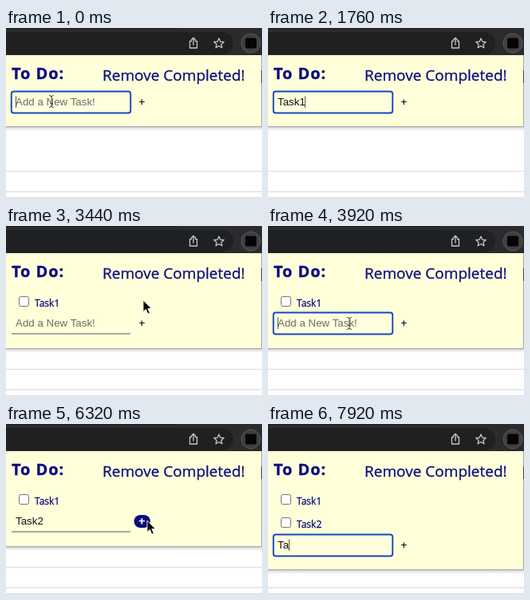
Write an HTML page that moves like this. It is 321 by 213 pixels and loops after 8000 ms.

```html
<!DOCTYPE html>
<html lang="en">
<head>
<meta charset="utf-8">
<title>To do list</title>
<style>
  html, body { margin: 0; width: 100%; height: 100%; overflow: hidden; background: #fff; }
  svg { display: block; width: 321px; height: 213px; }
  .hand {
    font-family: "Comic Sans MS", "Open Sans", sans-serif;
    fill: #0c0c80; stroke: #0c0c80; stroke-width: .3; stroke-linejoin: round;
  }
  .field { font: 13.33px "Liberation Sans", Arial, sans-serif; }
  .icon { fill: none; stroke: #c6c7c9; stroke-width: 1.3; stroke-linejoin: round; stroke-linecap: round; }
</style>
</head>
<body>
<svg viewBox="0 0 321 213">
  <defs>
    <linearGradient id="fade" x2="0" y2="1">
      <stop offset="0" stop-color="#000" stop-opacity=".38"/>
      <stop offset=".35" stop-color="#000" stop-opacity=".12"/>
      <stop offset="1" stop-color="#000" stop-opacity="0"/>
    </linearGradient>
  </defs>

  <!-- page -->
  <rect width="321" height="213" fill="#fff"/>
  <path d="M0 179.5H321" stroke="#dcdcdc"/>
  <path d="M0 204.5H321" stroke="#ececec"/>
  <path d="M0 205.5H321" stroke="#e4e4e4"/>
  <path d="M0 212.5H321" stroke="#dedede"/>

  <!-- popup -->
  <rect id="shadow" width="321" height="6" fill="url(#fade)"/>
  <rect id="popup" y="34" width="320" fill="#ffffda"/>
  <rect id="edge" x="320" y="34" width="1" fill="#a8a8a2"/>
  <path d="M320.5 53V69" stroke="#444"/>

  <!-- toolbar -->
  <rect width="321" height="34" fill="#2b2b2d"/>
  <path d="M0 .5H215" stroke="#1c1c1d"/>
  <rect x="-20" y="5" width="305" height="28" rx="14" fill="#1e2022"/>
  <g class="icon">
    <path d="M232.5 16.5H230.5V25H239.5V16.5H237.5M235 21V12.5M232.3 15L235 12.3L237.7 15"/>
    <path d="M267 13L268.8 17.1L273.2 17.5L269.9 20.4L270.9 24.8L267 22.5L263.1 24.8L264.1 20.4L260.8 17.5L265.2 17.1Z"/>
  </g>
  <circle cx="307" cy="19" r="12" fill="#3f3f41" stroke="#59595b"/>
  <rect x="300" y="12.5" width="14" height="13" rx="2" fill="#050505"/>

  <text class="hand" x="7" y="64" font-size="20" font-weight="700" letter-spacing=".9">To Do:</text>
  <text class="hand" x="121" y="66" font-size="19">Remove Completed!</text>

  <g id="tasks"></g>

  <!-- entry row -->
  <g id="entry">
    <rect id="ring" x="6.75" y="79.5" width="149.5" height="27" rx="3" fill="#ffffde" stroke="#1547c2" stroke-width="1.9"/>
    <path id="rule" d="M7 106H156" stroke="#555566"/>
    <text id="value" class="field" x="12" y="97"></text>
    <path id="caret" d="M0 85.5V100" stroke="#555"/>
    <rect id="pill" x="160.5" y="85" width="20.5" height="16" rx="8" fill="#0c0c80"/>
    <text id="plus" class="field" x="166.6" y="97">+</text>
  </g>

  <g id="mouse">
    <path id="beam" d="M-3 -7.5Q0 -7.5 0 -5.5Q0 -7.5 3 -7.5M0 -5.5V5.5M-3 7.5Q0 7.5 0 5.5Q0 7.5 3 7.5M-1.5 2.5H1.5" fill="none" stroke="#444"/>
    <path id="arrow" d="M0 0V14.5L3.4 11.3L5.8 17L8.3 16L5.9 10.4H10.5Z" fill="#000" stroke="#fff" stroke-width=".9"/>
  </g>
</svg>

<script>
const LOOP = 8000, STEP = 80, ROW = 29.5;
const $ = id => document.getElementById(id);
const show = (el, on) => el.setAttribute('display', on ? 'inline' : 'none');

// Each round: key times for the word, then the press on + and the moment the task is added.
const rounds = [
  { word: 'Task1', focus: 0, keys: [880, 1040, 1200, 1280, 1440], press: 3280, add: 3440 },
  { word: 'Task2', focus: 3840, keys: [4720, 4880, 5040, 5200, 5360], press: 6160, add: 6400 },
  { word: 'Task3', focus: 6960, keys: [7680, 7840], press: Infinity, add: Infinity }
];

// Pointer stops: time, x, y. It is hidden while typing.
const stops = [
  [0, 57, 92], [2400, 57, 92], [2960, 127, 93], [3200, 172, 93], [3520, 172, 93],
  [3840, 102, 122], [5520, 102, 122], [5920, 177, 121], [6480, 177, 121],
  [6880, 110, 151], [LOOP, 110, 151]
];
const hidden = [[880, 2400], [4720, 5520], [7680, LOOP]];

const tasks = rounds.slice(0, 2).map(({ word }, i) => {
  $('tasks').insertAdjacentHTML('beforeend',
    `<g transform="translate(0 ${Math.floor(i * ROW)})">
      <rect x="16.5" y="88.5" width="12" height="12" rx="2" fill="#fff" stroke="#767676"/>
      <text class="hand" x="36" y="101" font-size="12">${word}</text>
    </g>`);
  return $('tasks').lastElementChild;
});

function pointerAt(t) {
  const i = stops.findIndex((s, n) => n && t <= s[0]);
  const [t0, x0, y0] = stops[i - 1], [t1, x1, y1] = stops[i];
  const u = (t - t0) / (t1 - t0), k = u * u * (3 - 2 * u);
  return [x0 + (x1 - x0) * k, y0 + (y1 - y0) * k];
}

function draw(t) {
  const done = rounds.filter(r => t >= r.add).length;
  const { word, focus, keys, press } = rounds[done];
  const drop = Math.floor(done * ROW);
  const height = 89 + Math.round(done * ROW);
  const focused = t >= focus && t < press;
  const pressed = keys.filter(k => t >= k);
  const typed = word.slice(0, pressed.length);

  $('popup').setAttribute('height', height);
  $('edge').setAttribute('height', height);
  $('shadow').setAttribute('y', 34 + height);
  $('entry').setAttribute('transform', `translate(0 ${drop})`);
  tasks.forEach((el, i) => show(el, i < done));
  show($('ring'), focused);
  show($('rule'), !focused);

  const value = $('value');
  value.textContent = typed || 'Add a New Task!';
  value.setAttribute('fill', typed ? '#111' : '#6c6c6c');

  const lastInput = Math.max(focus, ...pressed);
  const end = typed ? value.getComputedTextLength() : 0;
  $('caret').setAttribute('transform', `translate(${Math.floor(12 + end) + 0.5} 0)`);
  show($('caret'), focused && (t - lastInput) % 1000 < 500);

  const [x, y] = pointerAt(t), row = y - drop;
  const inside = x > 7 && x < 156 && row > 79 && row < 108;
  const visible = !hidden.some(([a, b]) => t >= a && t < b);
  const hover = visible && x > 160 && x < 182 && row > 84 && row < 102;
  const ink = hover ? '#fff' : '#111';
  show($('mouse'), visible);
  $('mouse').setAttribute('transform', `translate(${x} ${y})`);
  show($('beam'), inside);
  show($('arrow'), !inside);
  show($('pill'), hover);
  $('plus').setAttribute('fill', ink);
  $('plus').setAttribute('stroke', ink);
  $('plus').setAttribute('stroke-width', hover ? 0.8 : 0.25);
}

const start = performance.now();
function tick() {
  const t = (performance.now() - start) % LOOP;
  draw(Math.floor(t / STEP) * STEP);
  requestAnimationFrame(tick);
}
draw(0);
requestAnimationFrame(tick);
</script>
</body>
</html>
```
